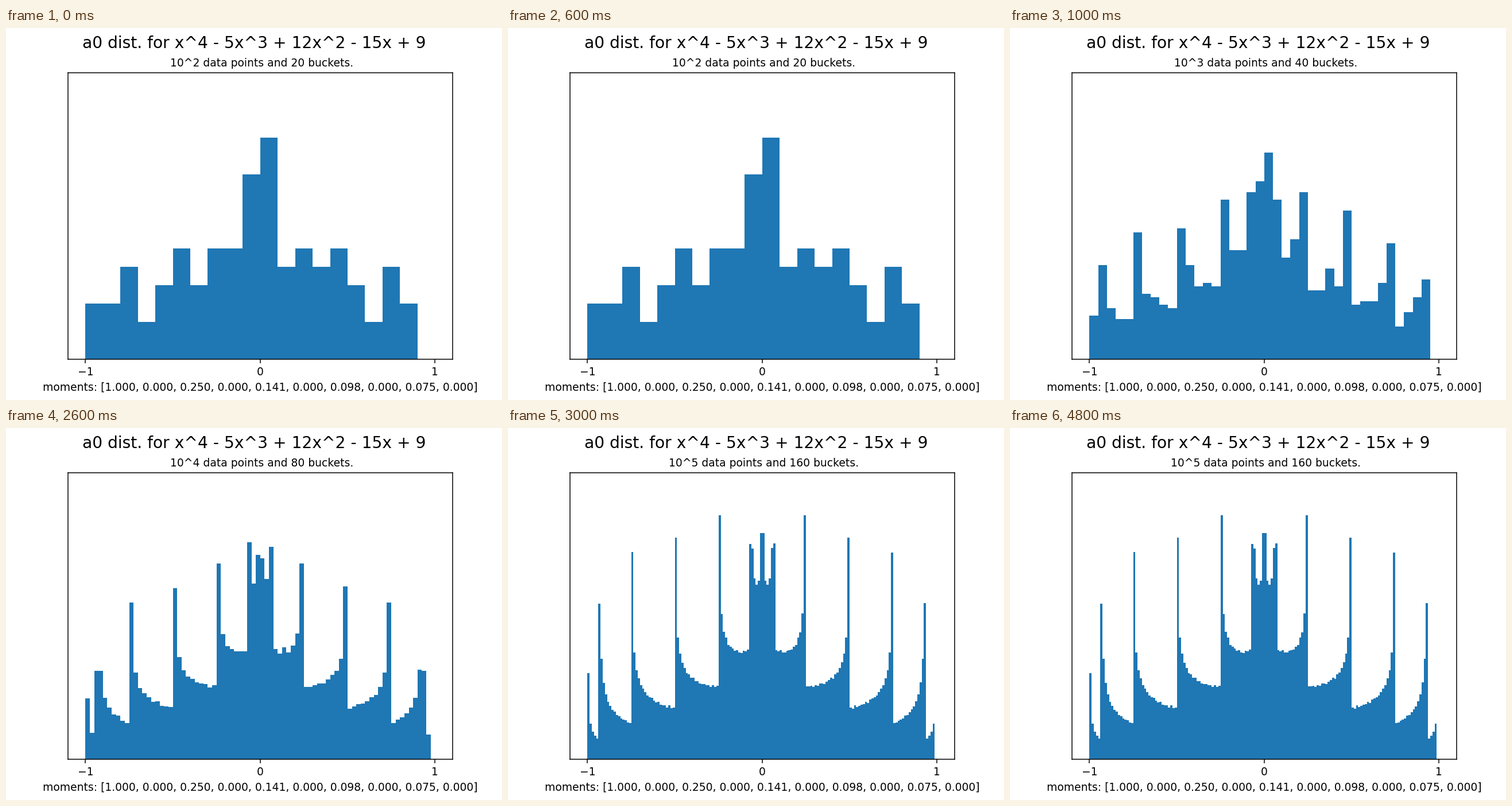
These frames come from a looping animation (864 px wide and 648 px high, 6 s). A matplotlib script:

```python
import matplotlib.pyplot as plt
import numpy as np
from matplotlib.animation import FuncAnimation

WIDTH, HEIGHT, DPI = 864, 648, 135
STEP_MS = 1000
STAGES = [0, 1, 2, 3, 3, 3]  # the finest histogram is held for three steps

MOMENTS = [1, 0, 1 / 4, 0, 9 / 64, 0, 25 / 256, 0, 1225 / 16384, 0]

plt.rcParams["font.family"] = "DejaVu Sans"


def normalized_traces(count):
    """Traces of the n-th powers of the roots, scaled to [-1, 1].

    The quartic is (x^2 - 3x + 3)(x^2 - 2x + 3), so the roots have modulus
    sqrt(3) and arguments +-pi/6 and +-arccos(1/sqrt(3)).
    """
    n = np.arange(1, count + 1)
    theta = np.arccos(1 / np.sqrt(3))
    return (np.cos(n * np.pi / 6) + np.cos(n * theta)) / 2


def draw(step):
    stage = STAGES[step]
    exponent, buckets = stage + 2, 20 * 2**stage
    edges = np.linspace(-1, 1, buckets + 1)[:-1]

    ax.clear()
    ax.hist(normalized_traces(10**exponent), bins=edges, density=True,
            color="#1f77b4")
    ax.set(xlim=(-1.1, 1.1), ylim=(0, 1.6), xticks=[-1, 0, 1], yticks=[])
    ax.set_title(f" 10^{exponent} data points and {buckets} buckets.",
                 fontsize=10)
    ax.set_xlabel("moments: [" + ", ".join(f"{m:.3f}" for m in MOMENTS) + "]",
                  fontsize=10)
    return ax.patches


fig, ax = plt.subplots(figsize=(WIDTH / DPI, HEIGHT / DPI), dpi=DPI)
fig.suptitle("a0 dist. for x^4 - 5x^3 + 12x^2 - 15x + 9", fontsize=15)

animation = FuncAnimation(fig, draw, frames=len(STAGES), interval=STEP_MS,
                          init_func=lambda: draw(0), repeat=True, blit=False)
plt.show()
```
